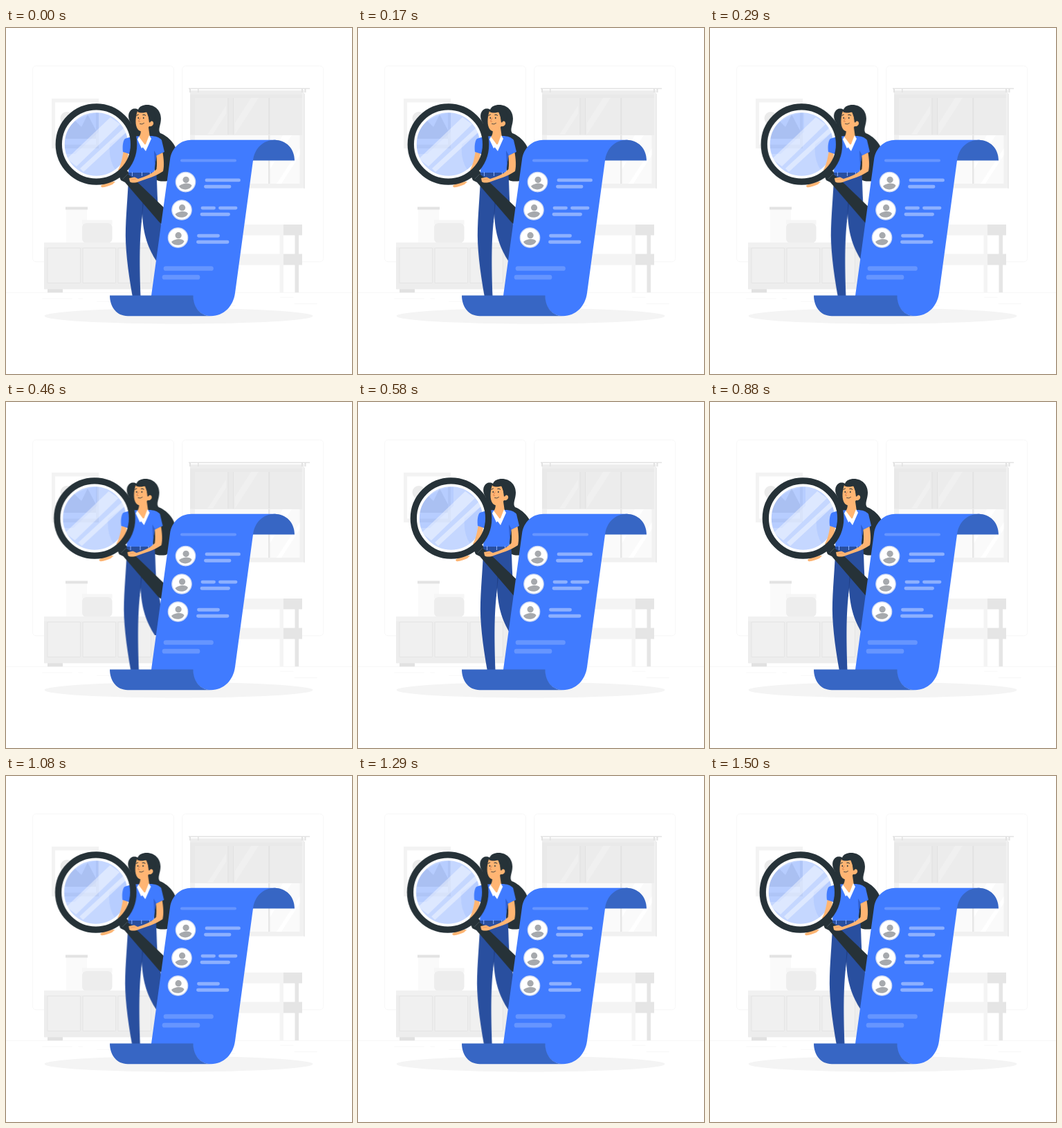
Write an HTML page that moves like this. It is 500 px wide and 500 px high and loops after 1540 ms.

```html
<!DOCTYPE html>
<html lang="en">
<head>
<meta charset="utf-8">
<title>Search profile</title>
<style>
  html, body { margin: 0; width: 100%; height: 100%; overflow: hidden; background: #fff; }
  svg { display: block; width: 100%; height: 100%; }
  #figure { animation: shake 1.5s ease infinite paused; }
  @keyframes shake {
    0%, 100% { transform: translateX(0); }
    10%, 90% { transform: translateX(-1px); }
    20%, 80% { transform: translateX(2px); }
    30%, 50%, 70% { transform: translateX(-4px); }
    40%, 60% { transform: translateX(4px); }
  }
  .dark { fill: #263238; }
  .blue { fill: #407bff; }
  .navy { fill: #294f9f; }
  .skin { fill: #ffb573; }
  .shade { fill: #3766c4; }
  .line { fill: none; stroke: #fff; stroke-linecap: round; }
</style>
</head>
<body>
<svg viewBox="0 0 500 500">
  <defs>
    <clipPath id="glass"><circle cx="131" cy="168" r="46.5"/></clipPath>
    <clipPath id="disc"><circle r="13"/></clipPath>
    <g id="avatar">
      <circle r="14.2" fill="#fff" stroke="#c9d6f3" stroke-width="1.3"/>
      <g fill="#a6a9ad" clip-path="url(#disc)">
        <circle cx=".6" cy="-3.3" r="4.6"/>
        <path d="M-9.5 6.2C-6 1.8 6-.2 9 5.2C6 12.5-6 12.5-9.5 6.2Z"/>
      </g>
    </g>
  </defs>

  <!-- room -->
  <g fill="none" stroke="#ebebeb" stroke-width=".4">
    <rect x="38.5" y="54.8" width="204" height="283" rx="5"/>
    <rect x="254.7" y="54.8" width="204" height="283" rx="5"/>
    <path d="M0 382.4H500M416.8 398.5h33M322.5 401.2h8.7M396.6 389.2h19M52.5 391h43M104.6 391h6.3M131.5 395.2h93.7"/>
  </g>

  <g>
    <path fill="#f3f3f3" d="M66 102h68v72h-68z"/>
    <path fill="#fff" d="M71 107.5h59v61h-59z"/>
    <circle cx="88" cy="130.500" r="9.500" fill="#ebebeb"/>
    <path fill="#ebebeb" d="M78 157L98 132L109 143L118 125L130 148V160H78Z"/>
  </g>

  <g>
    <path fill="#f1f1f1" d="M266 90H431V231.500H266Z"/>
    <path fill="#fafafa" d="M273 155H379V225H273ZM381.500 155H424.500V225H381.500Z"/>
    <path fill="#fff" d="M381.500 182L400 155H413L381.500 204ZM391 225L424.500 174V184L398 225Z"/>
    <path fill="#e6e6e6" d="M379 155h2.300v70h-2.300zM430.500 95h1.200v137h-1.200z"/>
    <path fill="#e9e9e9" d="M266 95.500H428V154.500H266Z"/>
    <path fill="#ededed" d="M266 91H428V96H266Z"/>
    <path fill="#ececec" d="M273 101H320.500V154.500H273ZM329 101H379V154.500H329ZM381.500 101H428V154.500H381.500Z"/>
    <path fill="#f0f0f0" d="M331 137L354 101H365L331 154ZM291 154L318 112V124L299 154Z"/>
    <path fill="#e1e1e1" d="M320.500 101h1v53h-1zM328 101h1v53h-1zM379.500 101h1.500v53h-1.500z"/>
    <path fill="#e2e2e2" d="M264 86.800H439V88.300H264ZM265 88.300h2v5h-2zM277 88.300h1.500v5h-1.500zM427 88.300h2v5h-2zM431.500 88.300h2v5h-2z"/>
  </g>

  <g>
    <path fill="#fafafa" d="M87 261H117V310H87Z"/>
    <path fill="#e3e3e3" d="M86 258.500H118V262.500H86Z"/>
    <path fill="#f6f6f6" d="M110 277.500H153.500V284H110Z"/>
    <rect x="110" y="282" width="43.500" height="28.500" rx="6" fill="#ededed"/>
    <path fill="#e1e1e1" d="M60 376H82V382.300H60Z"/>
    <path fill="#ededed" d="M55 310H240V377.500H55Z"/>
    <path fill="#f1f1f1" d="M55 310H240V317H55Z"/>
    <path fill="#f0f0f0" stroke="#e2e2e2" stroke-width=".8" d="M60 318H107.500V368.500H60ZM111 318H158.500V368.500H111ZM162 318H209.500V368.500H162Z"/>
  </g>

  <g>
    <path fill="#f4f4f4" d="M395.500 299H401V382.300H395.500ZM335 284H401V299.500H335ZM335 326.500H401V342.500H335Z"/>
    <path fill="#e5e5e5" d="M417.500 299H423V382.300H417.500ZM401 284H428V299.500H401ZM401 326.500H428V342.500H401Z"/>
  </g>

  <ellipse cx="249.500" cy="416.200" rx="194" ry="11.300" fill="#f4f4f4"/>

  <g id="figure">
    <!-- lens -->
    <circle cx="130.500" cy="168" r="52" fill="#407bff" fill-opacity=".3"/>
    <g clip-path="url(#glass)">
      <path fill="#407bff" opacity=".1" d="M84 150Q104 126 134 122V150L100 182H84ZM150 168L182 145V205H158Q148 190 150 168Z"/>
      <path fill="#fff" opacity=".42" d="M88 189L151 129L165 139L102 200ZM107 203L173 142L178 147L112 208Z"/>
    </g>
    <circle cx="130.500" cy="168" r="48" fill="none" stroke="#fff" stroke-width="4.500"/>

    <!-- hair behind -->
    <path class="dark" d="M204 111C216 111 224 120 224 131C224 140 219 147 223 152C234 156 246 168 247 180C248 200 243 214 234 221C228 222 220 222 217 219L208 165L190 158C182 152 179 144 181 138C176 132 175 121 183 117C187 116 190 117 191 118C193 113 198 111 204 111Z"/>

    <!-- legs -->
    <path class="navy" d="M191 212H217.500C219 232 218 252 222 272C225 288 230 310 234 337H217.500C206 319 198 299 197 268Z"/>
    <path fill="#203f85" d="M190 226C190 250 192 268 195.500 282L199 252Z"/>
    <path class="navy" d="M177 212H201C197 235 198 262 195 290C193 315 193 345 194.600 389H183C176 350 172 315 173 290C174 260 177 232 177 212Z"/>

    <!-- far arm and hand -->
    <path class="skin" d="M170 177L177 180C176 193 172 203 166 211L162 205C167 196 168 188 170 177ZM137 228C142 224 150 222 158 222L154 226C148 228 143 231 138 230Z"/>

    <!-- top -->
    <path class="blue" d="M172 160C180 157 190 156 197 156H209C216 156 222 158 225 162L229 179L217 185L214 211H177L178 182L169 179C168 171 169 163 172 160Z"/>
    <path fill="#2f5fce" d="M214 177L218 184L215 198ZM178 182L180 174L181 192Z"/>
    <path class="navy" d="M177 209H215L217 214H176Z"/>
    <path d="M182.500 208v6M196.500 208v6M208.500 208v6" stroke="#8cb0ff" stroke-width="1"/>
    <path class="skin" d="M195 144H206L208 158L201 171L192 158C195 154 195 149 195 144Z"/>
    <path fill="#fff" d="M207 155L210 160L202 178L196 170L202 168ZM192 157L201 169L196 174L190 161Z"/>

    <!-- head -->
    <path class="skin" d="M190 120C187 129 186 141 191 147C196 152 204 148 207 142C212 143 215 138 212 135C209 133 208 136 207 137L205 122Z"/>
    <path class="dark" d="M190 121C193 114 200 111 206 113C216 116 219 127 214 135C212 133 209 134 208 137C207 130 205 126 203 121C199 123 194 123 190 121Z"/>
    <path fill="none" stroke="#263238" stroke-width="1" stroke-linecap="round" d="M188.800 126.500l2.600-1.500M197.800 125.500q2.500-1 4 .8"/>
    <ellipse cx="191.300" cy="130" rx=".8" ry="1.200" class="dark"/>
    <ellipse cx="198.800" cy="130" rx=".8" ry="1.200" class="dark"/>
    <path fill="none" stroke="#d47a4c" stroke-width=".8" stroke-linecap="round" d="M194 130L191.500 135L193.500 135.500"/>
    <path fill="none" stroke="#263238" stroke-width=".8" stroke-linecap="round" d="M193.500 138.500Q197 140 199.500 137.500"/>

    <!-- magnifier -->
    <circle cx="130.500" cy="168" r="54.200" fill="none" stroke="#263238" stroke-width="9.300"/>
    <path class="dark" d="M163 213L174 206Q178 207 177 212L184 217L234 265V290L222 281L172 223L166 220Z"/>
    <path d="M169 218L176 211" stroke="#46545a" stroke-width="1"/>

    <!-- near arm -->
    <path class="skin" d="M217.500 184.500L226.500 180C228 189 229 199 227 207C215 215 203 218 192 222C187 224 181 224 179 222L178 217L186 215.500L191 218C201 215 211 211 217.500 204C218.500 198 218 191 217.500 184.500Z"/>
    <path d="M181 219l7-1" stroke="#e4925a" stroke-width=".7"/>
  </g>

  <!-- scroll -->
  <path class="blue" d="M390 161.800H268C252 161.800 239.500 173 237 190L209.800 388H270C270 404 281 416.200 296 416.200C315 416.200 328.500 402 331 383L357 191.500Z"/>
  <path class="shade" d="M417 191.500H357C359 174 372 161.800 388 161.800C405 161.800 417 174.500 417 191.500ZM150 386.500H270.500C270.500 404 281 416.200 296 416.200H176C160 416.200 150 403 150 386.500Z"/>
  <g class="line" stroke-width="4" opacity=".2">
    <path d="M254 191.500H331"/>
    <path stroke-width="6.700" d="M231 347.500H296.500M229 360.200H277"/>
  </g>
  <path class="line" stroke-width="4.900" opacity=".4" d="M290 219.900H336.500M288.500 229.300H323M284 260.100H300.500M309.500 260.100H332M283 269.300H321.500M278.500 300.200H306.500M277.500 309.300H320"/>
  <use href="#avatar" x="259.500" y="222.600"/>
  <use href="#avatar" x="254" y="263"/>
  <use href="#avatar" x="248.500" y="303"/>
</svg>
<script>
  // 37 steps per loop, each one 24th of a second along the shake
  const LOOP = 1540, STEPS = 37, STEP = 1000 / 24, LEAD = 14;
  const shake = document.getElementById('figure').getAnimations()[0];

  function draw() {
    const t = (performance.now() + 5) % LOOP;
    const step = Math.floor(t / LOOP * STEPS);
    shake.currentTime = step * STEP + LEAD;
    requestAnimationFrame(draw);
  }
  draw();
</script>
</body>
</html>
```
